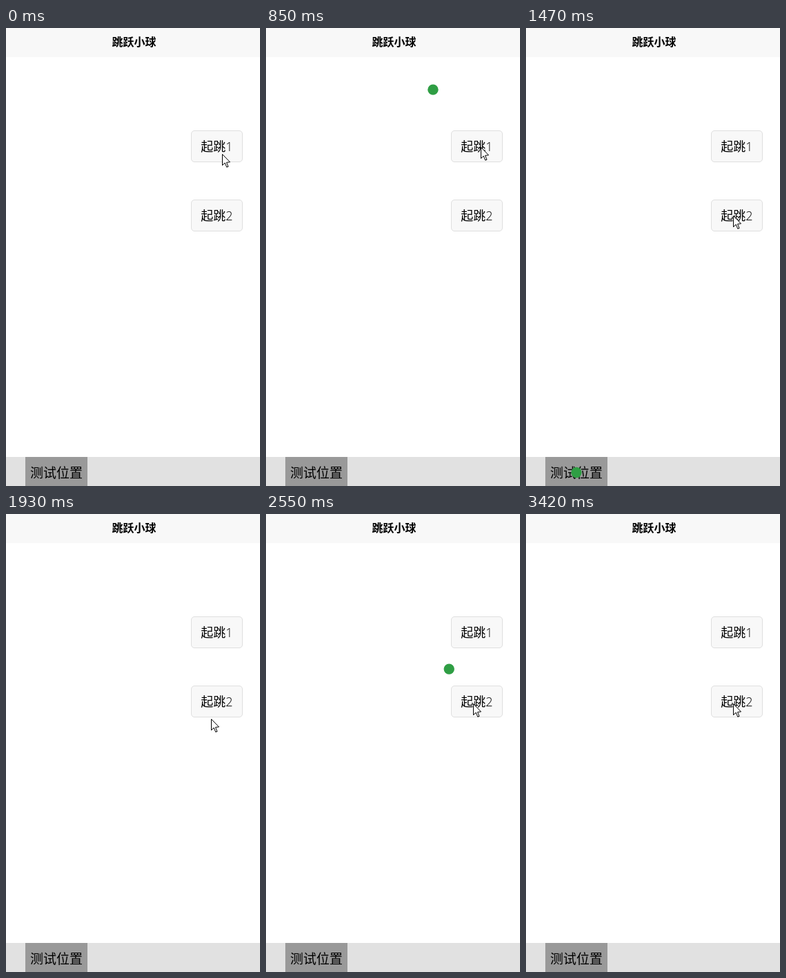
Animation, 368 px wide and 662 px high, one loop 3490 ms. Source, as an HTML page:

```html
<!DOCTYPE html>
<html lang="zh-CN">
<head>
<meta charset="utf-8">
<title>跳跃小球</title>
<style>
html, body { margin: 0; width: 100%; height: 100%; overflow: hidden; background: #fff; }
svg { display: block; width: 368px; height: 662px; }
text { font-family: "Open Sans", "Noto Sans CJK SC", "Noto Sans CJK", sans-serif; font-weight: 350; text-anchor: middle; }
.title { font-size: 16px; font-weight: 700; }
.button rect { fill: #f8f8f8; stroke: #dfdfdf; }
.button text { font-size: 18px; }
.pressed rect { fill: #dedede; stroke: #c7c7c7; }
.pressed text { fill: rgba(0, 0, 0, .6); }
</style>
</head>
<body>
<svg viewBox="0 0 368 662">
  <rect width="368" height="42" fill="#f8f8f8"/>
  <text class="title" x="185.5" y="26">跳跃小球</text>
  <g class="button">
    <rect x="268.5" y="148.5" width="74" height="45" rx="4.5"/>
    <text x="305.5" y="178">起跳1</text>
  </g>
  <g class="button">
    <rect x="268.5" y="248.5" width="74" height="45" rx="4.5"/>
    <text x="305.5" y="278">起跳2</text>
  </g>
  <rect y="620" width="368" height="42" fill="#e1e1e1"/>
  <rect x="28" y="620" width="90" height="42" fill="#999"/>
  <text x="73" y="650" font-size="19">测试位置</text>
  <circle id="ball" r="7.7" fill="#2f9e44"/>
  <circle id="halo" r="12" fill="#f0e614" fill-opacity=".6"/>
  <path id="cursor" d="M.5 .5V16.5L4.2 13 6.8 19.2 9 18.3 6.5 12.3 11.5 11.8Z" fill="#fff" stroke="#000"/>
</svg>
<script>
const LOOP = 3490, TICK = LOOP / 45, FLIGHT = 812;
const END = { x: 73, y: 642.5 };
const jumps = [
  { x: 306, y: 171, halo: 380, press: 550, show: 610, start: 630, hide: 1610 },
  { x: 300, y: 273, halo: 2160, press: 2315, show: 2395, start: 2435, hide: 3400 }
];
// time, x, y of the pointer tip
const path = [
  [0, 313, 182], [78, 313, 177], [155, 312, 172], [700, 312, 172], [1086, 310, 173],
  [1163, 309, 180], [1540, 298, 290], [1630, 297, 297], [1939, 297, 296],
  [2094, 300, 276], [2171, 300, 274], [LOOP, 300, 274]
];
const $ = id => document.getElementById(id);
const buttons = document.querySelectorAll('.button');
const lerp = (a, b, u) => a + (b - a) * u;
const clamp = u => Math.min(1, Math.max(0, u));
const within = (t, a, b) => t >= a && t < b;
const cubic = (s, a, b) => 3 * a * s * (1 - s) ** 2 + 3 * b * s * s * (1 - s) + s ** 3;

// rises first, then falls faster and faster
function hop(u) {
  let lo = 0, hi = 1;
  for (let i = 0; i < 24; i++) {
    const mid = (lo + hi) / 2;
    if (cubic(mid, .45, .82) < u) lo = mid; else hi = mid;
  }
  return cubic(hi, -.52, .21);
}

function place(el, x, y, shown = true) {
  el.setAttribute('transform', `translate(${x} ${y})`);
  el.style.display = shown ? '' : 'none';
}

function draw(t) {
  const i = path.findIndex(p => p[0] > t);
  const [a, b] = [path[i - 1], path[i]];
  const u = (t - a[0]) / (b[0] - a[0]);
  const x = Math.round(lerp(a[1], b[1], u)), y = Math.round(lerp(a[2], b[2], u));
  place($('cursor'), x, y);
  place($('halo'), x, y, jumps.some(j => within(t, j.halo, j.show)));

  jumps.forEach((j, n) =>
    buttons[n].classList.toggle('pressed', within(t, j.press, j.press + 120)));
  const jump = jumps.find(j => within(t, j.show, j.hide));
  const p = jump ? clamp((t - jump.start) / FLIGHT) : 0;
  const from = jump || END;
  place($('ball'), lerp(from.x, END.x, p), lerp(from.y, END.y, hop(p)), !!jump);
}

// the picture refreshes 45 times per loop
function frame() {
  const t = performance.now() % LOOP;
  draw(Math.min(44, Math.floor((t + 10) / TICK)) * TICK);
  requestAnimationFrame(frame);
}
frame();
</script>
</body>
</html>
```
